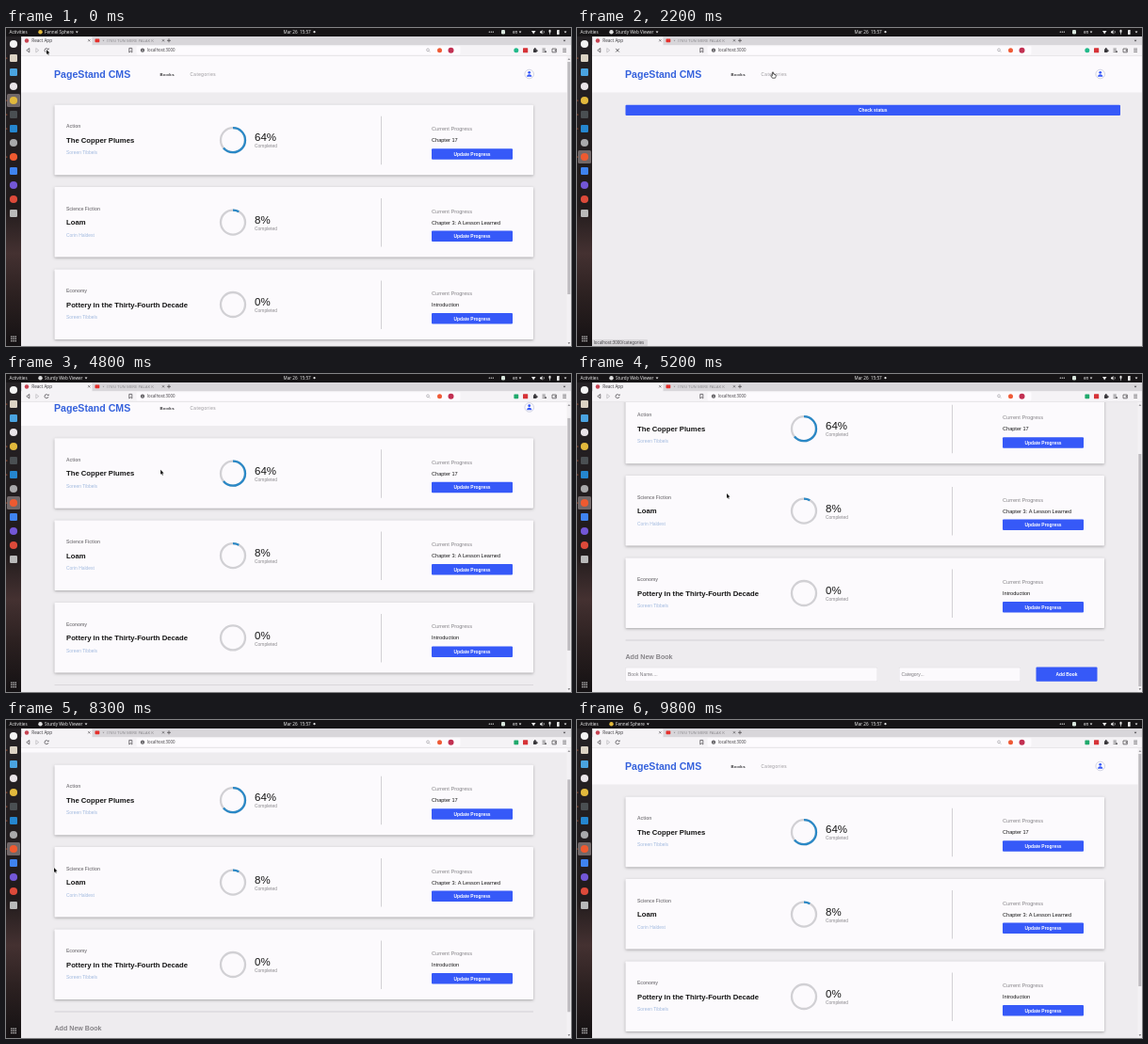
Animation, 600 px wide and 338 px high, one loop 9900 ms. Source, as an HTML page with a canvas:

```html
<!DOCTYPE html>
<html lang="en">
<head>
<meta charset="utf-8">
<title>Book manager demo</title>
<style>
html, body { margin: 0; width: 100%; height: 100%; overflow: hidden; background: #eeecef; }
canvas { display: block; width: 600px; height: 338px; }
</style>
</head>
<body>
<canvas id="stage"></canvas>
<script>
const W = 600, H = 338, LOOP = 9900, STEP = 100;
const canvas = document.getElementById('stage');
const c = canvas.getContext('2d');
const dpr = window.devicePixelRatio || 1;
canvas.width = W * dpr;
canvas.height = H * dpr;

const SANS = '"Liberation Sans", Arial, sans-serif';
const UI = '"Noto Sans", "Open Sans", sans-serif';
const BLUE = '#3659f8', PAPER = '#fcfafd', PAGE = '#eeecef';
const TOP = 30, LEFT = 16, MAX_SCROLL = 61;

const books = [
  { kind: 'Action', title: 'The Copper Plumes', author: 'Soreen Tibbels', done: 64, chapter: 'Chapter 17' },
  { kind: 'Science Fiction', title: 'Loam', author: 'Corin Haldest', done: 8, chapter: 'Chapter 3: A Lesson Learned' },
  { kind: 'Economy', title: 'Pottery in the Thirty-Fourth Decade', author: 'Soreen Tibbels', done: 0, chapter: 'Introduction' }
];

const dock = [
  ['#f4f4f4', 'o'], ['#dcd3c4', 's'], ['#4aa3e0', 's'], ['#e9e4e8', 'o'], ['#e2b93c', 'o'],
  ['#4a4f52', 's'], ['#2586cf', 's'], ['#a9a9ab', 'o'], ['#ee5a30', 'o'], ['#3f83f0', 's'],
  ['#7357d6', 'o'], ['#dd4a3a', 'o'], ['#b9b9b9', 's']
];

// time, x, y of the pointer tip
const pointerPath = [
  [0, 43, 23], [500, 43, 23], [1000, 140, 42], [1700, 206, 48], [2200, 208, 47], [2900, 208, 47],
  [3300, 172, 48], [3600, 170, 49], [4200, 168, 62], [4500, 168, 83], [5200, 159, 127], [6000, 160, 127],
  [6600, 508, 284], [7000, 538, 318], [7300, 500, 345], [7600, 400, 345], [8300, 51, 157],
  [8600, 51, 157], [9400, 450, -12]
];
const scrollPath = [[4700, 0], [5150, 61], [8150, 61], [8300, 34], [8650, 0]];

function along(path, t) {
  if (t <= path[0][0]) return path[0].slice(1);
  for (let i = 1; i < path.length; i++) {
    const a = path[i - 1], b = path[i];
    if (t <= b[0]) {
      const k = (t - a[0]) / (b[0] - a[0]);
      return a.slice(1).map((v, j) => v + (b[j + 1] - v) * k);
    }
  }
  return path[path.length - 1].slice(1);
}

function rect(x, y, w, h, fill, r = 0) {
  c.fillStyle = fill;
  c.beginPath();
  c.roundRect(x, y, w, h, r);
  c.fill();
}

function disc(x, y, r, fill) {
  c.fillStyle = fill;
  c.beginPath();
  c.arc(x, y, r, 0, Math.PI * 2);
  c.fill();
}

function arc(x, y, r, from, to, color, width) {
  c.strokeStyle = color;
  c.lineWidth = width;
  c.beginPath();
  c.arc(x, y, r, from, to);
  c.stroke();
}

function ring(x, y, r, color, width) {
  arc(x, y, r, 0, Math.PI * 2, color, width);
}

function line(points, color, width = 0.7, close = false) {
  c.strokeStyle = color;
  c.lineWidth = width;
  c.beginPath();
  points.forEach(([x, y]) => c.lineTo(x, y));
  if (close) c.closePath();
  c.stroke();
}

function poly(points, fill) {
  c.fillStyle = fill;
  c.beginPath();
  points.forEach(([x, y]) => c.lineTo(x, y));
  c.closePath();
  c.fill();
}

// y is the middle of the capitals
function text(s, x, y, size, color, o = {}) {
  c.font = `${o.weight || 400} ${size}px ${o.font || SANS}`;
  c.letterSpacing = (o.spacing || 0) + 'px';
  c.textAlign = o.align || 'left';
  c.fillStyle = color;
  c.fillText(s, x, y + size * 0.36);
}

function caret(x, y, color, r = 1.5) {
  poly([[x - r, y - r / 2], [x + r, y - r / 2], [x, y + r]], color);
}

function cross(x, y, r, color, width) {
  line([[x - r, y - r], [x + r, y + r]], color, width);
  line([[x + r, y - r], [x - r, y + r]], color, width);
}

function button(x, y, w, h, label) {
  rect(x, y, w, h, BLUE, 1);
  text(label, x + w / 2, y + h / 2, 4.9, '#fff', { weight: 700, align: 'center' });
}

function card(book, y) {
  c.save();
  c.shadowColor = 'rgba(0,0,0,.3)';
  c.shadowBlur = 3 * dpr;
  c.shadowOffsetY = dpr;
  rect(51.5, y, 508.5, 74.5, PAPER, 0.8);
  c.restore();

  text(book.kind, 64, y + 23, 4.9, '#858387', { weight: 700 });
  text(book.title, 64, y + 37.5, 7.7, '#121212', { weight: 700 });
  text(book.author, 64, y + 51, 4.95, '#a3bbdf');

  ring(241, y + 37.5, 13, '#d1d0d4', 2.3);
  if (book.done) {
    const start = -Math.PI / 2;
    arc(241, y + 37.5, 13, start, start + Math.PI * 2 * book.done / 100, '#2a88c6', 2.3);
  }
  text(book.done + '%', 264, y + 34.5, 11.5, '#121212');
  text('Completed', 264, y + 44, 4.95, '#8b898d');

  rect(398.2, y + 12, 0.8, 51.5, '#c9c7cb');
  text('Current Progress', 452, y + 25.5, 5.65, '#858387');
  text(book.chapter, 452, y + 37.5, 5.6, '#151515');
  button(452, y + 46.5, 86, 11.5, 'Update Progress');
}

function field(x, y, w, hint) {
  rect(x, y, w, 15, '#dfdde1', 1);
  rect(x + 0.4, y + 0.4, w - 0.8, 14.2, PAPER, 1);
  text(hint, x + 2.5, y + 7.5, 5, '#7d7b7f');
}

function header() {
  rect(LEFT, TOP, W - LEFT, 38.5, PAPER);
  text('PageStand CMS', 51, 49.5, 10.6, '#3461dc', { weight: 700 });
  text('Books', 163.5, 49.7, 4.3, '#29282b', { weight: 700, spacing: 0.5 });
  text('Categories', 195.5, 49.7, 4.5, '#929094', { spacing: 0.58 });
  ring(555.7, 49, 4.8, '#b9bdd0', 0.6);
  disc(555.7, 47.3, 1.4, BLUE);
  c.fillStyle = BLUE;
  c.beginPath();
  c.arc(555.7, 51.8, 2.6, Math.PI, 0);
  c.fill();
}

function page(scroll, onCategories) {
  c.save();
  c.beginPath();
  c.rect(LEFT, TOP, W - LEFT, H - TOP);
  c.clip();
  rect(LEFT, TOP, W - LEFT, H - TOP, PAGE);

  c.save();
  c.translate(0, -scroll);
  header();
  if (onCategories) {
    button(51.5, 81.8, 525.5, 11.2, 'Check status');
  } else {
    books.forEach((book, i) => card(book, 81.7 + i * 87.4));
    rect(51.5, 343.6, 508.5, 0.8, '#d3d1d5');
    text('Add New Book', 51.5, 361, 7.1, '#858387', { weight: 700 });
    field(51.5, 372.8, 267.5, 'Book Name....');
    field(342, 372.8, 129, 'Category...');
    button(487.5, 372.6, 65, 15.2, 'Add Book');
  }
  c.restore();

  if (!onCategories) {
    rect(595.5, TOP, 4.5, H - TOP, '#f3f1f4');
    rect(596.3, 36 + scroll * 49 / MAX_SCROLL, 3, 247, '#bdbbbf');
    poly([[596.5, 34], [599.3, 34], [597.9, 32]], '#99979b');
    caret(597.9, 334.8, '#6b696d', 1.3);
  }
  c.restore();
}

function systemBar(app, accent) {
  const white = '#e9e9e9', o = { font: UI, weight: 500 };
  rect(0, 0, W, 9, '#161416');
  text('Activities', 3.5, 4.2, 4.6, white, o);
  disc(36.5, 4.2, 2.2, accent);
  text(app, 41, 4.2, 4.6, white, o);
  caret(43.5 + c.measureText(app).width + 1, 4.2, white, 1.4);
  text('Mar 26  15:57', 294.5, 4.2, 4.6, white, o);
  disc(327.5, 4.2, 1.1, white);
  [513.3, 515.3, 517.3].forEach(x => disc(x, 4.2, 0.65, white));
  rect(526, 2, 4, 4.6, '#d9e7de', 1.3);
  text('en', 538, 4.2, 4.6, white, o);
  caret(546, 4.2, white, 1.3);
  poly([[558, 3], [562.5, 3], [560.2, 6.5]], white);
  poly([[567, 3.4], [568, 3.4], [569.5, 2], [569.5, 6.6], [568, 5.2], [567, 5.2]], white);
  arc(569.7, 4.3, 1.7, -1, 1, white, 0.6);
  rect(576.5, 1.8, 2, 3.3, white, 1);
  line([[577.5, 5], [577.5, 6.8]], white, 0.7);
  rect(585, 2, 2.6, 5, white, 0.4);
  caret(594, 4.2, white, 1.4);
}

function sideDock(active) {
  const g = c.createLinearGradient(0, 9, 0, H);
  g.addColorStop(0, '#242124');
  g.addColorStop(0.55, '#211b1c');
  g.addColorStop(0.7, '#443131');
  g.addColorStop(0.84, '#2b2020');
  g.addColorStop(1, '#141113');
  rect(0, 9, LEFT, H - 9, g);
  rect(1, active * 15 + 10, 14, 14, '#716869', 1.5);
  dock.forEach(([color, shape], i) => {
    const y = 17 + i * 15;
    if (shape === 'o') disc(8, y, 4.1, color);
    else rect(4, y - 4, 8, 8, color, 1.2);
  });
  [1, 4, 5, 6, 8].forEach(i => disc(0.8, 17 + i * 15, 0.6, '#e0653c'));
  for (let i = 0; i < 9; i++) {
    rect(5.2 + (i % 3) * 2.2, 327.5 + Math.floor(i / 3) * 2.2, 1.3, 1.3, '#dedede');
  }
}

function browser(loading, early) {
  const ink = '#424044', soft = '#98969a';
  rect(LEFT, 9, W - LEFT, 9.5, '#d8d6da');
  rect(17, 9.5, 74.5, 9.5, '#f5f3f6', 1);
  disc(22, 13.5, 2.2, '#c64352');
  text('React App', 27.3, 13.3, 4.6, ink, { font: UI });
  cross(88.3, 13.3, 1.1, ink, 0.6);
  rect(94.5, 11.6, 4.8, 3.7, '#e5302c', 0.8);
  caret(103.5, 13.3, soft, 1);
  text('(765) TUN MERE PALAK K', 107, 13.3, 4.3, '#8b898d', { font: UI });
  cross(167, 13.3, 1.1, ink, 0.6);
  line([[171, 13.3], [175, 13.3]], ink, 0.7);
  line([[173, 11.3], [173, 15.3]], ink, 0.7);
  caret(593, 13.3, ink, 1.3);

  rect(LEFT, 18.2, W - LEFT, 11.8, '#f5f3f6');
  rect(LEFT, 29.5, W - LEFT, 0.5, '#dcdadd');
  line([[24.8, 21.5], [21.8, 23.7], [24.8, 25.9]], ink, 0.7, true);
  line([[31.8, 21.5], [34.8, 23.7], [31.8, 25.9]], '#b8b6ba', 0.7, true);
  if (loading) cross(43, 23.7, 1.8, ink, 0.8);
  else {
    arc(43, 23.7, 2, 0.2, 5.5, ink, 0.7);
    poly([[43.8, 22.9], [45.5, 22.9], [45.5, 21.2]], ink);
  }
  line([[130.8, 21.4], [133.8, 21.4], [133.8, 26], [132.3, 24.7], [130.8, 26]], ink, 0.7, true);

  rect(138.5, 19.3, 344, 9, '#fdfbfe', 1.2);
  disc(145, 23.7, 2.1, '#555357');
  rect(144.7, 22.5, 0.6, 2.5, '#fff');
  text('localhost:3000', 150, 23.7, 4.35, ink, { font: UI });
  ring(448, 23.3, 1.4, soft, 0.6);
  line([[449, 24.3], [450.3, 25.7]], soft, 0.6);
  disc(460.5, 23.7, 2.5, '#ef5a36');
  disc(472.5, 23.7, 3, '#c23052');

  if (early) disc(541.8, 23.7, 2.5, '#22b98a');
  else rect(539.4, 21.4, 4.8, 4.8, '#20a96c', 0.7);
  rect(549, 21.2, 5.2, 5, '#d63237', 0.5);
  rect(560, 22.3, 3.5, 3.7, '#3a383c', 0.5);
  disc(561.8, 22, 0.9, '#3a383c');
  disc(563.8, 24.2, 0.9, '#3a383c');
  [22, 23.7, 25.4].forEach(y => line([[569.5, y], [572.8, y]], ink, 0.6));
  disc(573, 25.2, 0.9, ink);
  line([[580, 22], [584.3, 22], [584.3, 25.8], [580, 25.8]], ink, 0.7, true);
  rect(582.6, 23.3, 1.6, 1.1, ink);
  [22, 23.7, 25.4].forEach(y => line([[591.2, y], [595, y]], ink, 0.6));
}

function statusTip(label) {
  const w = label.length > 15 ? 59 : 35;
  rect(LEFT, 331, w, 7, '#d9d7da', 1);
  text(label, 17.7, 334.6, 4.45, '#444246', { font: UI });
}

function pointer(x, y, hand) {
  c.save();
  c.translate(x, y);
  c.lineJoin = 'round';
  if (hand) {
    const shape = [[-0.6, 0], [0.6, 0], [0.7, 2], [3, 2.6], [3.2, 4.5], [2.5, 6.2], [-0.6, 6.2], [-2.2, 3.7], [-1.5, 3.1], [-0.6, 3.8]];
    poly(shape, '#fff');
    line(shape, '#1a1a1a', 0.7, true);
  } else {
    const shape = [[0, 0], [0, 5], [1.1, 4], [1.9, 5.8], [2.7, 5.4], [1.9, 3.7], [3.5, 3.6]];
    line(shape, '#fff', 0.9, true);
    poly(shape, '#141414');
  }
  c.restore();
}

function draw(t) {
  const scroll = along(scrollPath, t)[0];
  const [x, y] = along(pointerPath, t);
  const onCategories = t >= 2150 && t < 3600;
  const onLink = (a, b) => !scroll && x >= a && x <= b && y >= 45 && y <= 54;
  const overBooks = onLink(162, 180), overCategories = onLink(195, 224);
  const otherApp = t < 300 || t >= 9800;

  c.setTransform(dpr, 0, 0, dpr, 0, 0);
  page(scroll, onCategories);
  browser(t >= 300 && t < 2600, t < 2600);
  sideDock(t < 300 ? 4 : 8);
  systemBar(otherApp ? 'Fennel Sphere' : 'Sturdy Web Viewer', otherApp ? '#e2b93c' : '#dedede');
  if (overCategories) statusTip('localhost:3000/categories');
  else if (overBooks) statusTip('localhost:3000');
  pointer(x, y, overBooks || overCategories);
}

const begin = performance.now();
function tick() {
  const t = (performance.now() - begin) % LOOP;
  draw(Math.floor(t / STEP) * STEP);
  requestAnimationFrame(tick);
}
tick();
</script>
</body>
</html>
```
